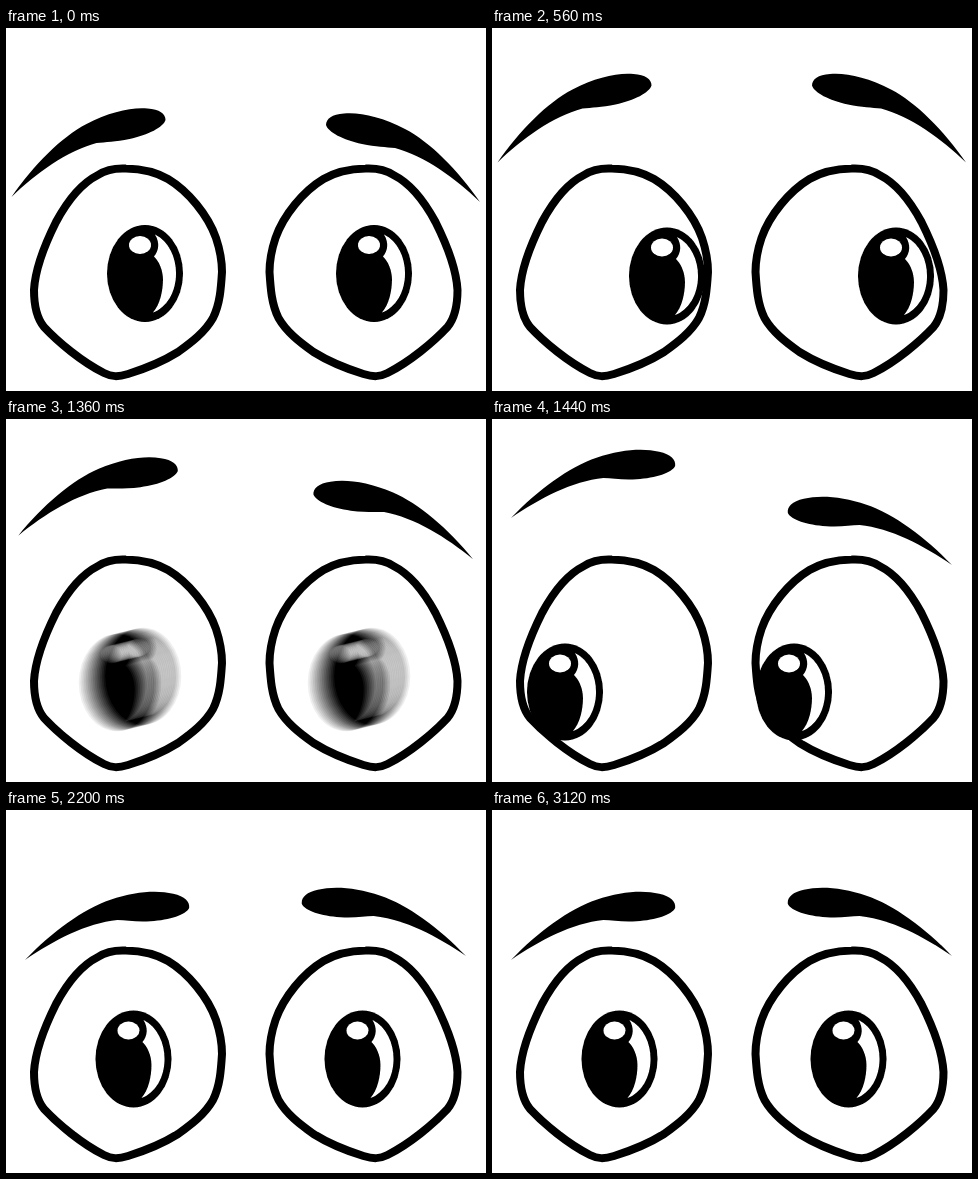
An HTML page that plays this animation: 480 by 363 pixels, repeating every 3480 ms.

```html
<!DOCTYPE html>
<html lang="en">
<head>
<meta charset="utf-8">
<title>Glancing eyes</title>
<style>
  html, body { margin: 0; width: 100%; height: 100%; overflow: hidden; background: #fff; }
  svg { display: block; width: 100%; height: 100%; }
  .outline { fill: none; stroke: #000; stroke-width: 8; stroke-linejoin: round; stroke-linecap: round; }
  .white { fill: #fff; }
  /* Sixteen exposures add up to one motion-blurred pupil. */
  .pupil { isolation: isolate; }
  .pupil use { opacity: 0.0625; mix-blend-mode: plus-lighter; }
  .open { animation: wink-open 3480ms step-end infinite; }
  .lid { animation: wink-lid 3480ms step-end infinite; }
  /* 2920 ms to 3120 ms */
  @keyframes wink-open { 0%, 89.6552% { visibility: visible; } 83.908% { visibility: hidden; } }
  @keyframes wink-lid { 0%, 89.6552% { visibility: hidden; } 83.908% { visibility: visible; } }
</style>
</head>
<body>
<svg viewBox="0 0 480 363">
  <defs>
    <path id="brow" d="M0,0 C22,-32 50,-60 75,-73 C98,-85 120,-90 136,-88.500 C148,-88 154,-83 154,-77
      C152,-70 137,-62 118,-58 C104,-55 94,-55 85,-54 C55,-46 25,-24 0,0Z"/>
    <path id="socket" d="M92,147 C101,141 110,140 120,140.500 C138,141 150,144 162,151 C182,163 202,187 210,210
      C215,225 216,235 216,244 C215,260 214,276 207,290 C199,304 186,314 172,324 C156,334 138,341 122,346
      C112,349 106,349 98,345 C76,334 52,314 38,299 C29,288 28,274 28,262 C29,244 38,218 50,194
      C64,168 78,154 92,147Z"/>
    <g id="pupil">
      <ellipse rx="38" ry="48.500"/>
      <path class="white" d="M10,-39 C24,-32 31,-16 31,0 C31,18 22,34 8,39 C15,31 18,18 18,6
        C18,-4 14,-12 9,-17 C14,-23 15,-31 10,-39Z"/>
      <ellipse class="white" cx="-5" cy="-28.500" rx="11" ry="9"/>
    </g>
  </defs>
  <g>
    <g class="pupil"></g>
    <use class="outline" href="#socket"/>
  </g>
  <g class="open">
    <g class="pupil" transform="translate(229)"></g>
    <use class="outline" href="#socket" transform="translate(479.500) scale(-1 1)"/>
  </g>
  <path class="outline lid" d="M260,300 C290,374 421,374 451,300"/>
  <use id="left-brow" href="#brow"/>
  <use id="right-brow" href="#brow"/>
</svg>
<script>
  const LOOP = 3480, STEP = 40, MOVE = 160;
  const EXPOSURES = 16, SHUTTER = 0.2;

  // Each brow is placed by its outer tip; tilt is in degrees.
  const poses = [
    { x: 139, y: 245.5, lx: 5.5, ly: 169, lt: 0, rx: 474, ry: 174, rt: 0 },
    { x: 175, y: 248, lx: 5.5, ly: 134.5, lt: 0, rx: 474, ry: 134.5, rt: 0 },
    { x: 73, y: 273, lx: 19, ly: 99, lt: 9, rx: 460, ry: 146, rt: 9 },
    { x: 127.5, y: 249, lx: 19, ly: 150, lt: 9, rx: 460, ry: 146, rt: 9 }
  ];
  // lead: how far into the move its first visible step is.
  const moves = [
    { at: 440, lead: 40 },
    { at: 1280, lead: 0 },
    { at: 2080, lead: 40 }
  ];

  const pupils = [...document.querySelectorAll('.pupil')];
  const leftBrow = document.getElementById('left-brow');
  const rightBrow = document.getElementById('right-brow');

  for (const pupil of pupils) {
    for (let i = 0; i < EXPOSURES; i++) {
      const copy = document.createElementNS('http://www.w3.org/2000/svg', 'use');
      copy.setAttribute('href', '#pupil');
      pupil.append(copy);
    }
  }

  const clamp = p => Math.min(1, Math.max(0, p));
  const ease = p => 0.8 * p * p * (3 - 2 * p) + 0.2 * p;

  function mix(a, b, k) {
    const pose = {};
    for (const key in a) pose[key] = a[key] + (b[key] - a[key]) * k;
    return pose;
  }

  function draw(time) {
    const t = Math.floor(time / STEP) * STEP;
    const index = moves.findLastIndex(move => t >= move.at);
    const move = moves[index];
    const from = poses[Math.max(0, index)], to = poses[index + 1];
    const p = move ? clamp((t - move.at + move.lead) / MOVE) : 1;
    const shutter = p < 1 ? SHUTTER : 0;

    for (let i = 0; i < EXPOSURES; i++) {
      const shift = ((i + 0.5) / EXPOSURES - 0.5) * shutter;
      const { x, y } = mix(from, to, ease(clamp(p + shift)));
      for (const pupil of pupils) pupil.children[i].setAttribute('transform', `translate(${x} ${y})`);
    }

    const pose = mix(from, to, ease(p));
    leftBrow.setAttribute('transform', `translate(${pose.lx} ${pose.ly}) rotate(${pose.lt})`);
    rightBrow.setAttribute('transform', `translate(${pose.rx} ${pose.ry}) scale(-1 1) rotate(${pose.rt})`);
  }

  const start = performance.now();
  function tick() {
    draw((performance.now() - start) % LOOP);
    requestAnimationFrame(tick);
  }
  tick();
</script>
</body>
</html>
```
